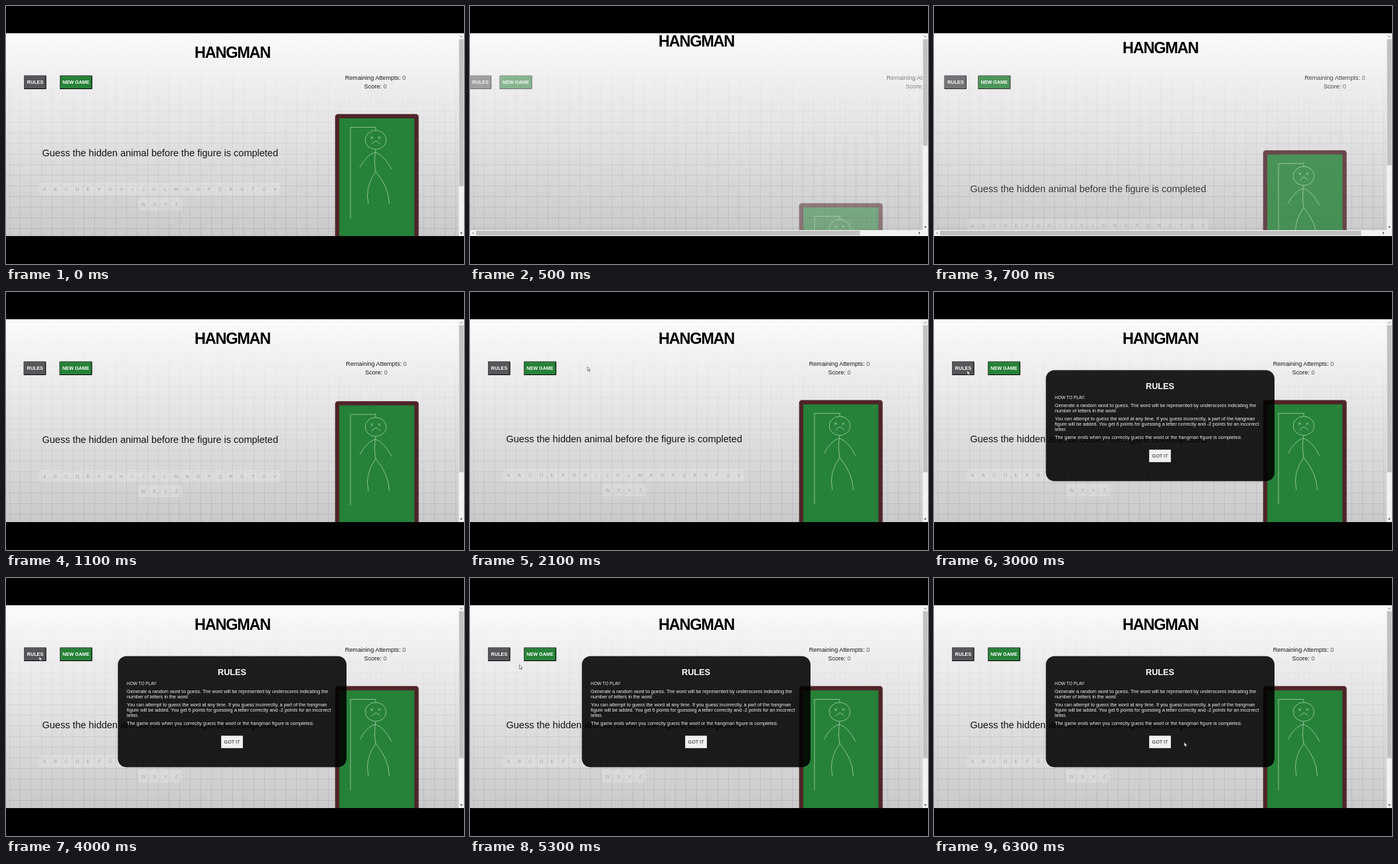
An HTML page that plays this animation: 690 by 388 pixels, repeating every 8000 ms.

```html
<!DOCTYPE html>
<html lang="en">
<head>
<meta charset="utf-8">
<title>Hangman</title>
<style>
html, body { margin: 0; width: 100%; height: 100%; overflow: hidden; background: #000; }
svg { display: block; font-family: "Liberation Sans", Arial, sans-serif; }
.mid { text-anchor: middle; }
.btn { font-size: 7.2px; font-weight: bold; fill: #fff; }
.lit { fill: none; stroke: #4c4c4c; }
.shade { fill: none; stroke: #000; }
.key { font-size: 7.5px; fill: #a5a4a7; text-anchor: middle; }
.chalk { fill: none; stroke: #a6d3af; stroke-width: .8; }
.rules { font-size: 7.25px; fill: #f2f2f2; }
</style>
</head>
<body>
<svg width="690" height="388" viewBox="0 0 690 388">
  <defs>
    <linearGradient id="light" x2="0" y2="1">
      <stop stop-color="#fffdfe" stop-opacity=".94"/><stop offset="1" stop-color="#fffdfe" stop-opacity="0"/>
    </linearGradient>
    <pattern id="grid" width="16" height="16" x="5" y="46" patternUnits="userSpaceOnUse">
      <path d="M0 .5H16M.5 0V16" stroke="#55555f" stroke-opacity=".16"/>
    </pattern>
  </defs>

  <svg y="41" width="690" height="305" viewBox="0 41 690 305">
    <rect y="41" width="690" height="305" fill="#cac9cb"/>
    <rect y="41" width="690" height="305" fill="url(#grid)"/>
    <rect y="41" width="690" height="305" fill="url(#light)"/>

    <text id="title" x="284" y="78" font-size="23.5" font-weight="bold" letter-spacing="-1.25">HANGMAN</text>

    <g id="rulesBtn">
      <rect x="27" y="104.5" width="33.5" height="20.5" fill="#57565a"/>
      <path class="lit" d="M27.5 125V105H60"/>
      <path class="shade" d="M60 105V124.5H27.5"/>
      <text class="btn mid" x="44" y="117.3">RULES</text>
    </g>
    <g id="newBtn">
      <rect x="81" y="104.5" width="49" height="20.5" fill="#268238"/>
      <path class="lit" d="M81.5 125V105H129.500"/>
      <path class="shade" d="M129.500 105V124.500H81.500"/>
      <text class="btn mid" x="105.5" y="117.3">NEW GAME</text>
    </g>
    <g id="score" class="mid" font-size="9.1" fill="#1a1a1a">
      <text x="556.5" y="111.3">Remaining Attempts: <tspan fill="#555">0</tspan></text>
      <text x="556.5" y="124.3">Score: <tspan fill="#555">0</tspan></text>
    </g>

    <g id="main">
      <text x="54.5" y="225.7" font-size="14.5" fill="#151515">Guess the hidden animal before the figure is completed</text>
      <g id="keys"></g>
      <rect x="499" y="165.8" width="119.5" height="210" rx="1" fill="#268238" stroke="#4f2529" stroke-width="6.4"/>
      <path class="chalk" d="M519 319V182.5H557V187M557 216Q554 234 557 249
        M556 220Q543 224 533 243M557 220Q570 225 581 246
        M557 249Q540 272 546 298M557 249Q577 273 577.5 298
        M549 196l4 4m0-4l-4 4M560.5 196l4 4m0-4l-4 4M551 208Q557 198 564 208"/>
      <ellipse class="chalk" cx="557" cy="201.3" rx="15.8" ry="14.3"/>
    </g>

    <g id="hbar">
      <rect y="337" width="690" height="9" fill="#f1f1f1"/>
      <rect id="hthumb" x="9" y="338" height="7" fill="#c1c1c1"/>
      <path d="M5.5 339.5V343.5L3 341.5Z" fill="#a3a3a3"/>
      <path d="M676 339.5V343.5L678.5 341.5Z" fill="#505050"/>
    </g>
    <rect x="682" y="41" width="8" height="305" fill="#f1f1f1"/>
    <rect id="vthumb" x="682.6" y="50" width="6.8" fill="#c1c1c1"/>
    <path d="M684 47H688L686 44.5Z" fill="#a3a3a3"/>
    <path id="down" d="M684 340.5H688L686 343Z" fill="#505050"/>

    <g id="modal">
      <rect x="168.5" y="117.5" width="344.5" height="167" rx="13" fill="#000" fill-opacity=".88"/>
      <text class="mid" x="340.5" y="146" font-size="12.7" font-weight="bold" fill="#fff">RULES</text>
      <g class="rules">
        <text x="182" y="161" font-size="6.5">HOW TO PLAY:</text>
        <text x="182" y="173">Generate a random word to guess. The word will be represented by underscores indicating the</text>
        <text x="182" y="181.3">number of letters in the word</text>
        <text x="182" y="193">You can attempt to guess the word at any time. If you guess incorrectly, a part of the hangman</text>
        <text x="182" y="201.3">figure will be added. You get 6 points for guessing a letter correctly and -2 points for an incorrect</text>
        <text x="182" y="209.3">letter.</text>
        <text x="182" y="221.3">The game ends when you correctly guess the word or the hangman figure is completed.</text>
      </g>
      <rect x="324.5" y="237.5" width="32" height="18" fill="#f0f0f0" stroke="#cfcfcf"/>
      <text class="mid" x="340.5" y="249.2" font-size="7.2" fill="#222">GOT IT</text>
    </g>

    <path id="cursor" d="M0 0V6.2L1.4 5 2.5 7.2 3.4 6.800 2.500 4.700H4.500Z" fill="#fff" stroke="#333" stroke-width=".6"/>
  </svg>
</svg>

<script>
const $ = id => document.getElementById(id);
const LOOP = 8000, STEP = 100, MODAL_OPENS = 2700;
const clamp = v => Math.min(1, Math.max(0, v));
const lerp = (a, b, k) => a + (b - a) * k;
const show = (id, on) => $(id).style.display = on ? '' : 'none';

$('keys').innerHTML = [...'ABCDEFGHIJKLMNOPQRSTUVWXYZ'].map((c, i) => {
  const x = i < 22 ? 58 + i * 16.53 : 207.3 + (i - 22) * 16.53, y = i < 22 ? 275.5 : 298;
  return `<rect x="${x - 7.8}" y="${y - 9.5}" width="15.6" height="19" rx="2" fill="#fff" fill-opacity=".2"/>
    <text class="key" x="${x}" y="${y + 2.7}">${c}</text>`;
}).join('');

// Entrance: start offset of each part, and whether it fades in
const entrance = [
  ['title', 0, -35, false], ['rulesBtn', -58, 0, true], ['newBtn', -75, 0, true],
  ['score', 240, 0, true], ['main', 0, 275, true]
];

// Pointer path: time, x, y. It comes in from the top left and rests on the rules button.
const path = [
  [1800, 38, 65], [2100, 177, 112.5], [2600, 50, 118], [4600, 50, 118], [4700, 52, 119],
  [5200, 52, 119], [5600, 142, 165], [5900, 142, 165], [6300, 377, 247]
];

// CSS "ease" timing curve
function ease(x) {
  if (x <= 0 || x >= 1) return clamp(x);
  const bez = (a, b, s) => 3 * a * s * (1 - s) ** 2 + 3 * b * s * s * (1 - s) + s ** 3;
  let lo = 0, hi = 1;
  for (let i = 0; i < 20; i++) {
    const s = (lo + hi) / 2;
    if (bez(.25, .25, s) < x) lo = s; else hi = s;
  }
  return bez(.1, 1, lo);
}

function pointer(t) {
  const i = path.findIndex(p => p[0] > t);
  if (i < 0) return path[path.length - 1].slice(1);
  const [a, b] = [path[i - 1], path[i]], k = (t - a[0]) / (b[0] - a[0]);
  return [lerp(a[1], b[1], k), lerp(a[2], b[2], k)];
}

function scrollbars(left) {
  const wide = Math.max(0, 240 * left - 16), bar = wide > 0 ? 9 : 0;
  const tall = Math.max(396, 380 + 275 * left);
  show('hbar', bar);
  $('hthumb').setAttribute('width', 664 * 682 / (682 + wide));
  $('vthumb').setAttribute('height', (287 - bar) * (305 - bar) / tall);
  $('down').setAttribute('transform', `translate(0 ${-bar})`);
}

function draw(t) {
  const shown = t < 300 ? 1 : ease((t - 200) / 1000), left = 1 - shown;
  for (const [id, x, y, fades] of entrance) {
    $(id).setAttribute('transform', `translate(${x * left} ${y * left})`);
    if (fades) $(id).setAttribute('opacity', shown);
  }
  scrollbars(left);
  show('modal', t >= MODAL_OPENS);
  const pointing = t >= path[0][0];
  show('cursor', pointing);
  if (pointing) $('cursor').setAttribute('transform', `translate(${pointer(t)})`);
}

const start = performance.now();
function tick() {
  const t = (performance.now() - start) % LOOP;
  draw(Math.floor(t / STEP) * STEP);
  requestAnimationFrame(tick);
}
tick();
</script>
</body>
</html>
```
